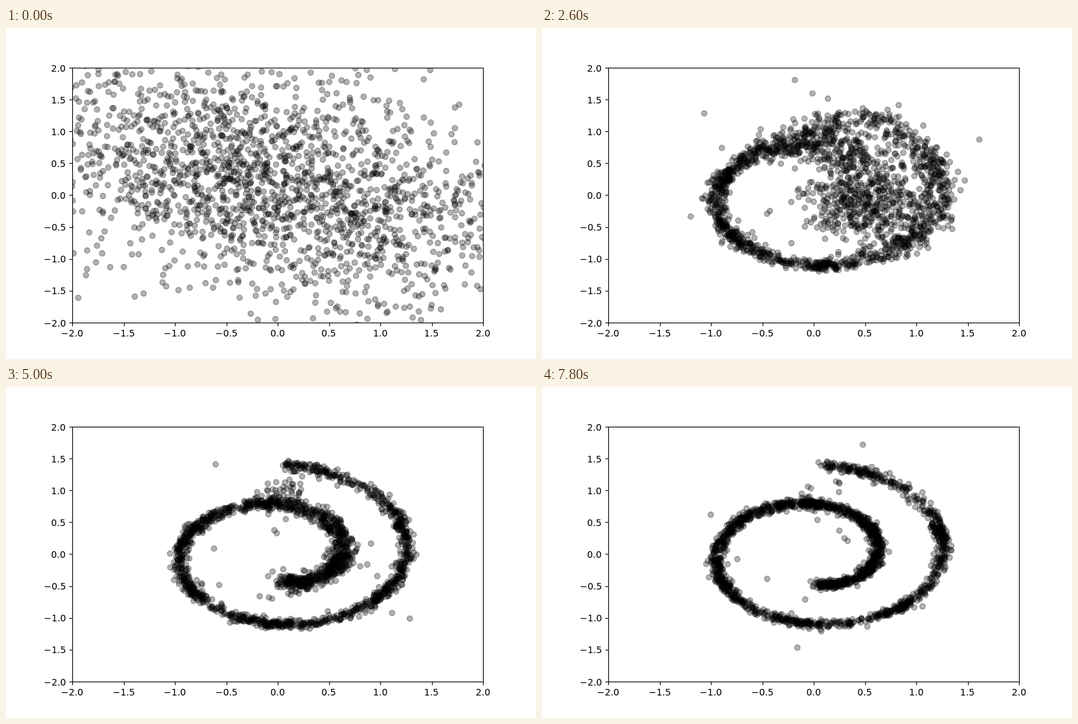
Recreate the animation shown at these times as an HTML page with a canvas. Size 800 px wide and 500 px high, loop 8 s.

```html
<!DOCTYPE html>
<html lang="en">
<head>
<meta charset="utf-8">
<title>Spiral scatter</title>
<style>
  html, body { margin: 0; width: 100%; height: 100%; overflow: hidden; background: #fff; }
  canvas { display: block; width: 800px; height: 500px; }
</style>
</head>
<body>
<canvas id="stage" width="800" height="500"></canvas>
<script>
const ctx = document.getElementById('stage').getContext('2d');
const STEP = 200, STEPS = 40, COUNT = 2000;
const BOX = { x: 100, y: 60, w: 620, h: 385 };
const CENTER = { x: 0.6, y: 0.03 };

const mix = (a, b, k) => a + (b - a) * k;
const toX = x => BOX.x + (x + 2) / 4 * BOX.w;
const toY = y => BOX.y + (2 - y) / 4 * BOX.h;

function smooth(from, to, v) {
  const k = Math.max(0, Math.min(1, (v - from) / (to - from)));
  return k * k * (3 - 2 * k);
}

function seeded(seed) {
  let s = seed * 7919 + 17;
  return () => {
    s = (s + 0x6D2B79F5) | 0;
    let t = Math.imul(s ^ (s >>> 15), 1 | s);
    t = (t + Math.imul(t ^ (t >>> 7), 61 | t)) ^ t;
    return ((t ^ (t >>> 14)) >>> 0) / 4294967296;
  };
}

function spiral(u) {
  const t = Math.PI * (1.5 + 3 * u);
  return { x: t * Math.cos(t) / 10, y: t * Math.sin(t) / 10 };
}

// A fresh sample per step: a wide cloud settles on the spiral,
// first on its left side, then the outer arm, then the inner one.
function samples(step) {
  const rand = seeded(step + 1);
  const gauss = () => Math.sqrt(-2 * Math.log(1 - rand())) * Math.cos(2 * Math.PI * rand());
  const cloud = Math.pow(Math.max(0, 1 - step / 5), 2);
  const innerLoose = 1 - smooth(10, 29, step);
  const outerLoose = 1 - smooth(4, 17, step);
  const base = 0.036 + 0.05 * Math.exp(-Math.max(0, step - 5) / 6);
  const reach = mix(0.95, 1, smooth(9, 25, step));
  const bridge = 0.005 + 0.04 * (1 - smooth(17, 31, step));
  const points = [];

  for (let i = 0; i < COUNT; i++) {
    let u = rand();
    u += 0.035 * outerLoose * Math.sin(2 * Math.PI * u);
    u = (u + 0.006 * Math.sin(60 * u + step * 2.3)) * reach;

    const inner = innerLoose * (1 - smooth(0.2, 0.45, u));
    const outer = outerLoose * smooth(0.66, 0.82, u);
    const tip = innerLoose * (1 - smooth(0, 0.16, u));
    const pull = 0.6 * tip + 0.24 * outer;
    let spread = base + 0.23 * inner + 0.23 * outer;
    let { x, y } = spiral(u);
    x = mix(x, CENTER.x, pull);
    y = mix(y, CENTER.y, pull);

    if (rand() < bridge) {
      const k = rand();
      x = mix(-0.1, 0.2, k);
      y = mix(0.78, 1.25, k);
      spread = 0.1;
    }
    if (rand() < 0.016) spread += 0.27;
    x += spread * gauss();
    y += spread * gauss();

    if (cloud > 0) {
      const cx = -0.05 + 1.25 * gauss();
      const cy = 0.17 - 0.3 * cx + 0.87 * gauss();
      x = mix(x, cx, cloud);
      y = mix(y, cy, cloud);
    }
    points.push({ x, y });
  }
  return points;
}

function line(x1, y1, x2, y2) {
  ctx.beginPath();
  ctx.moveTo(x1, y1);
  ctx.lineTo(x2, y2);
  ctx.stroke();
}

function drawAxes() {
  ctx.strokeStyle = ctx.fillStyle = '#000';
  ctx.lineWidth = 1.11;
  ctx.strokeRect(BOX.x + 0.5, BOX.y + 0.5, BOX.w, BOX.h);
  ctx.font = '13.89px "DejaVu Sans", sans-serif';
  for (let v = -2; v <= 2; v += 0.5) {
    const label = v.toFixed(1).replace('-', '\u2212');
    const width = ctx.measureText(label).width;
    const x = Math.round(toX(v)) + 0.5;
    const y = Math.ceil(toY(v) - 0.5) + 0.5;
    line(x, 445.5, x, 450.4);
    line(95.6, y, 100.5, y);
    ctx.fillText(label, Math.round(toX(v) - width / 2), 466);
    ctx.fillText(label, Math.round(90.3 - width), Math.round(toY(v) + 5.5));
  }
}

function draw(step) {
  ctx.fillStyle = '#fff';
  ctx.fillRect(0, 0, 800, 500);
  ctx.save();
  ctx.beginPath();
  ctx.rect(BOX.x, BOX.y, BOX.w, BOX.h);
  ctx.clip();
  ctx.fillStyle = ctx.strokeStyle = 'rgba(0,0,0,0.3)';
  ctx.lineWidth = 1.39;
  for (const p of samples(step)) {
    ctx.beginPath();
    ctx.arc(toX(p.x), toY(p.y), 4.17, 0, 2 * Math.PI);
    ctx.fill();
    ctx.stroke();
  }
  ctx.restore();
  drawAxes();
}

let shown = -1;
function tick() {
  const step = Math.floor(performance.now() / STEP) % STEPS;
  if (step !== shown) draw(shown = step);
  requestAnimationFrame(tick);
}
tick();
</script>
</body>
</html>
```
